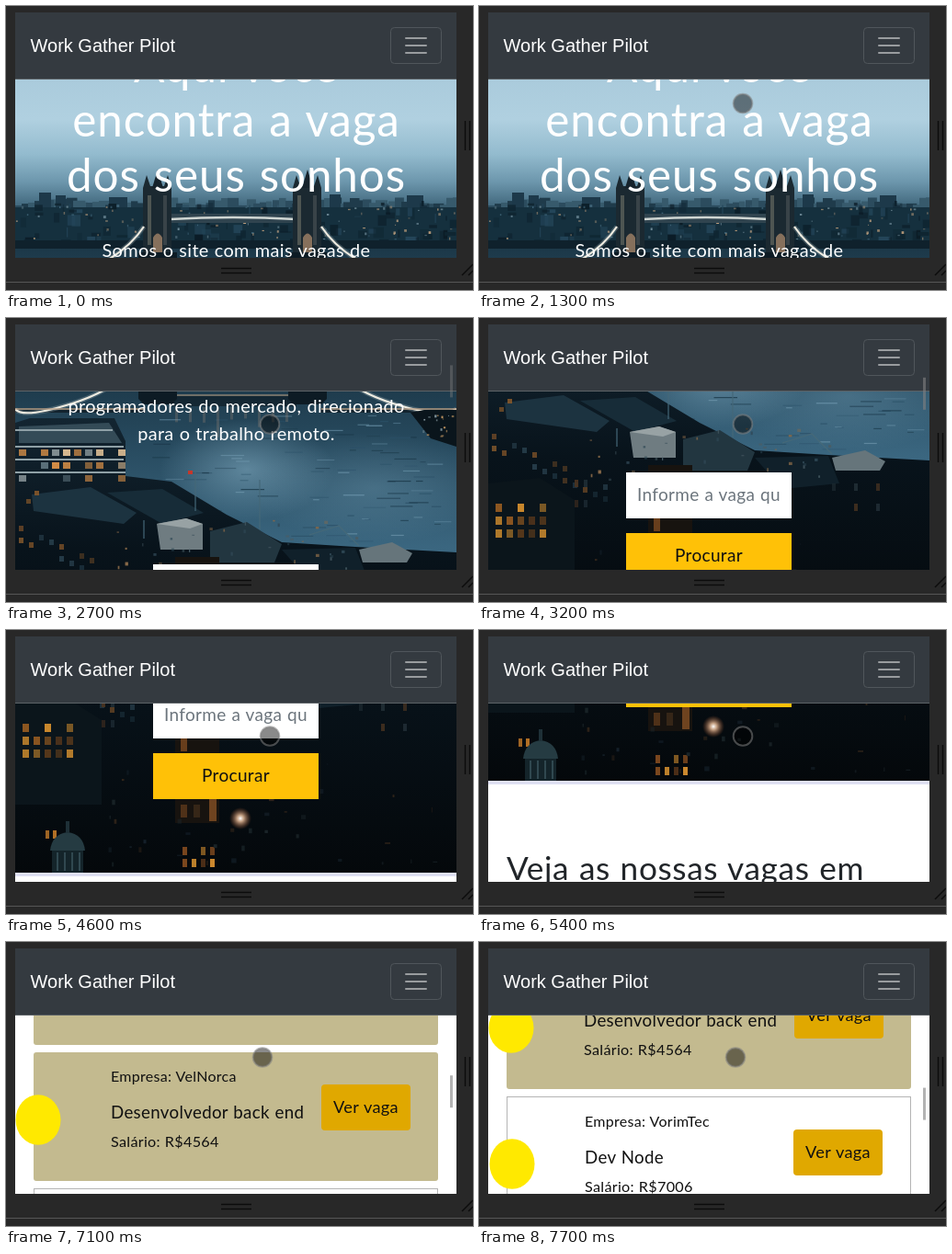
These frames come from a looping animation (508x309 px, 8000 ms). An HTML page:

```html
<!DOCTYPE html>
<html lang="pt">
<head>
<meta charset="utf-8">
<title>Vagas</title>
<style>
html, body { margin: 0; width: 100%; height: 100%; overflow: hidden; background: #282828; }
svg { display: block; width: 508px; height: 309px; }
text { font-family: Lato, "Open Sans", sans-serif; letter-spacing: .018em; word-spacing: .03em; }
.brand { font-family: "Liberation Sans", Arial, sans-serif; letter-spacing: 0; word-spacing: 0; }
</style>
</head>
<body>
<svg id="stage" viewBox="0 0 508 309" xmlns="http://www.w3.org/2000/svg">
  <defs>
    <clipPath id="view"><rect x="10" y="79" width="480" height="195"/></clipPath>
    <clipPath id="field"><rect x="172" y="468" width="156" height="50"/></clipPath>
    <linearGradient id="sky" x1="0" y1="0" x2="0" y2="1">
      <stop offset="0" stop-color="#a9cadb"/><stop offset=".35" stop-color="#b0d0e0"/>
      <stop offset=".6" stop-color="#93bbce"/><stop offset=".8" stop-color="#6c96ac"/>
      <stop offset="1" stop-color="#3a6075"/>
    </linearGradient>
    <linearGradient id="river" x1="0" y1="0" x2="0" y2="1">
      <stop offset="0" stop-color="#1b3646"/><stop offset=".35" stop-color="#26485c"/>
      <stop offset="1" stop-color="#3d6a84"/>
    </linearGradient>
    <radialGradient id="shine">
      <stop offset="0" stop-color="#7fa9bf" stop-opacity=".6"/><stop offset="1" stop-color="#7fa9bf" stop-opacity="0"/>
    </radialGradient>
    <linearGradient id="bank" x1="0" y1="0" x2="0" y2="1">
      <stop offset="0" stop-color="#132531"/><stop offset=".4" stop-color="#08131b"/>
      <stop offset="1" stop-color="#04080b"/>
    </linearGradient>
    <radialGradient id="glow">
      <stop offset="0" stop-color="#fff"/><stop offset=".3" stop-color="#f2c5a0" stop-opacity=".8"/>
      <stop offset="1" stop-color="#a05028" stop-opacity="0"/>
    </radialGradient>
  </defs>
  <g clip-path="url(#view)"><g id="page"></g></g>
  <g id="frame"></g>
  <rect id="thumb" x="483" width="3" height="35" fill="#808080" fill-opacity=".6"/>
  <circle id="touch" r="10.3" fill="#000" fill-opacity=".46" stroke="#808080" stroke-opacity=".55" stroke-width="2"/>
</svg>
<script>
const $ = id => document.getElementById(id);
const page = $('page'), frame = $('frame'), thumb = $('thumb'), touch = $('touch');

function add(parent, tag, attrs, content) {
  const el = document.createElementNS('http://www.w3.org/2000/svg', tag);
  for (const k in attrs) el.setAttribute(k, attrs[k]);
  if (content) el.textContent = content;
  parent.appendChild(el);
  return el;
}
const rect = (x, y, width, height, fill, more) =>
  add(page, 'rect', { x, y, width, height, fill, ...more });
const path = (d, fill, more) => add(page, 'path', { d, fill, ...more });
const line = (d, stroke, width, parent = page) =>
  add(parent, 'path', { d, fill: 'none', stroke, 'stroke-width': width });
const text = (str, x, y, size, fill, more) =>
  add(page, 'text', { x, y, 'font-size': size, fill, ...more }, str);
const middle = { 'text-anchor': 'middle' };

let seed = 7;
const rnd = (a, b) => {
  seed = (seed * 16807) % 2147483647;
  return a + (b - a) * seed / 2147483647;
};
const pick = list => list[Math.floor(rnd(0, list.length))];

// Small specks of light inside a box
function lights(n, x, y, w, h, colors, size) {
  for (let i = 0; i < n; i++)
    rect(rnd(x, x + w), rnd(y, y + h), rnd(1, size), rnd(1, size), pick(colors), { opacity: rnd(.4, 1) });
}

// Rows of lit windows, each column shifted down by slope
function windows(x, y, cols, rows, dx, dy, w, h, colors, slope = 0) {
  for (let r = 0; r < rows; r++)
    for (let c = 0; c < cols; c++)
      if (rnd(0, 1) > .35)
        rect(x + c * dx, y + r * dy + c * slope, w, h, pick(colors), { opacity: rnd(.5, 1) });
}

function skyline() {
  rect(10, 70, 480, 152, 'url(#sky)');
  for (let x = 10; x < 490; x += 7) {
    const h = rnd(2, 11);
    rect(x, 219 - h, rnd(6, 14), h + 14, pick(['#2c4c5e', '#1f3b4b', '#375a6c']));
  }
  for (const [x, y, w] of [[36, 203, 13], [54, 206, 11], [112, 208, 20], [352, 205, 12], [436, 206, 18]])
    rect(x, y, w, 30, '#1d394a');
  rect(10, 219, 480, 45, '#15303e');
  lights(110, 10, 212, 480, 46, ['#0b1c26', '#24465a', '#0f2531'], 13);
  lights(110, 10, 216, 480, 44, ['#6f8b98', '#9c8a74', '#42677b', '#c9a57f'], 3);
}

function tower(x) {
  path(`M${x - 3} 270V198l4-14 4 12h15l4-12 4 14v72z`, '#1b2931');
  path(`M${x + 7} 198l6-20 6 20z`, '#15222b');
  rect(x + 2, 206, 4, 54, '#4e5552');
  rect(x + 19, 206, 4, 54, '#394348');
  path(`M${x + 8} 268v-16q5-9 10 0v16z`, '#86705c');
  path(`M${x - 8} 268h42v20l-6 6h-30l-6-6z`, '#0d1b24');
}

function bridge() {
  rect(10, 255, 480, 210, 'url(#river)');
  rect(10, 255, 480, 9, '#0f212c');
  add(page, 'ellipse', { cx: 262, cy: 365, rx: 95, ry: 55, fill: 'url(#shine)' });
  add(page, 'ellipse', { cx: 400, cy: 385, rx: 130, ry: 60, fill: 'url(#shine)', opacity: .5 });
  for (let i = 0; i < 90; i++)
    rect(rnd(130, 470), rnd(305, 445), rnd(6, 26), 1.2, pick(['#6d95ab', '#1b3849', '#2b5067']), { opacity: rnd(.3, .8) });
  rect(178, 226, 138, 10, '#30444f');
  line('M178 232Q247 228 316 232', '#cfd6d3', 2.5);
  rect(178, 284, 138, 12, '#142733');
  line('M178 284H316', '#8e8474', 1.5);
  tower(152);
  tower(315);
  rect(10, 298, 142, 5, '#12232e');
  rect(342, 298, 148, 5, '#12232e');
  for (const d of ['M150 240Q126 276 72 293T10 299', 'M343 240Q367 276 421 293T490 299']) {
    line(d, '#8fa1a5', 5).setAttribute('opacity', .35);
    line(d, '#eeebe0', 2.2);
  }
  line('M10 299H150M343 299H490', '#b7a18a', 1.5);
  for (let i = 0; i < 9; i++)
    rect(184 + i * 15, 297, 3, rnd(12, 40), '#a98d78', { opacity: .25 });
  path('M440 303L455 300H490V340L462 331z', '#0a151c');
  lights(16, 450, 303, 38, 30, ['#c79a63', '#8ca0a8'], 3);
}

function bank() {
  path('M10 314L26 309H118L130 334V372L180 378L240 414L300 444L380 449L490 455V664H10z', 'url(#bank)');

  // Terraces by the water
  path('M14 318L112 314L126 336H14z', '#344b57');
  line('M10 322H116M10 340H128M10 354H128M10 368H130', '#8fa0a6', 2);
  windows(14, 343, 10, 3, 12, 14, 8, 7, ['#e9c79a', '#bcc7c8', '#5c717b', '#d58e47']);
  rect(198, 366, 5, 4, '#c5372b');

  // Roofs
  path('M28 392L92 384L142 412L128 424L30 410z', '#1c3340');
  path('M110 390L170 386L215 412L170 424z', '#172c38');
  path('M164 424L196 418L214 424V452H168z', '#6f7c81');
  path('M164 424L196 418L214 424L200 429z', '#98a2a4');
  path('M222 432L262 422L300 446L292 466H222z', '#223640');
  path('M384 452L420 444L442 456L436 466H388z', '#66757b');
  path('M300 452L380 450L392 480L330 486z', '#10202a');
  line('M206 368V410M276 376V430M150 420V440M330 436L362 426L384 448', '#456878', 1.2);
  windows(14, 426, 13, 2, 11, 13, 5, 6, ['#1d333f', '#6b4826', '#2c4452', '#a06a30'], 5);
  windows(22, 388, 2, 2, 9, 9, 5, 5, ['#d69139', '#8b5a2a']);
  lights(40, 120, 415, 270, 60, ['#4a5d66', '#8a6a48', '#2f4755'], 4);

  // Lit house on the left
  path('M10 480L66 474L104 498V590H10z', '#0b151b');
  windows(18, 502, 5, 3, 12, 14, 7, 9, ['#e0962f', '#b36a22', '#5f3b1b']);
  windows(104, 476, 2, 3, 10, 22, 4, 8, ['#4a3320', '#223039']);
  windows(360, 480, 5, 2, 24, 22, 4, 8, ['#4b3522', '#1f2c33', '#6a4524']);

  // Tall house in the middle
  path('M184 460H232V610H184z', '#17130f');
  windows(190, 470, 3, 6, 14, 24, 7, 14, ['#7e4a20', '#4e351f', '#b36e2d']);
  rect(221, 580, 8, 28, '#6e431f');
  windows(192, 636, 4, 2, 10, 13, 5, 9, ['#e69a33', '#8a4f20']);
  add(page, 'circle', { cx: 255, cy: 605, r: 12, fill: 'url(#glow)' });
  windows(43, 618, 2, 1, 8, 8, 4, 9, ['#d9872b']);

  // Dome
  path('M48 640Q50 622 67 620Q84 622 86 640z', '#253b42');
  rect(65, 608, 4, 13, '#1e3037');
  rect(50, 640, 34, 24, '#14242a');
  line('M56 642V662M64 642V662M72 642V662M80 642V662', '#304850', 2);
  lights(36, 110, 540, 370, 115, ['#1b2529', '#35271b', '#15212a'], 6);
}

function hero() {
  skyline();
  bridge();
  bank();
  const white = '#fff';
  ['Aqui você', 'encontra a vaga', 'dos seus sonhos']
    .forEach((s, i) => text(s, 250.5, 82.5 + i * 59.5, 49.4, white, middle));
  ['Somos o site com mais vagas de', 'programadores do mercado, direcionado', 'para o trabalho remoto.']
    .forEach((s, i) => text(s, 250.5, 273 + i * 30, 19.9, white, middle));
  rect(160, 468, 180, 50, white);
  text('Informe a vaga que', 172, 499, 19, '#6c757d', { 'clip-path': 'url(#field)' });
  rect(160, 534, 180, 50, '#ffc107');
  text('Procurar', 250, 565, 19, '#111', middle);
}

function card(i, company, job, pay, plain) {
  const y = 872 + i * 148, d = plain ? 1 : 0;
  if (plain) rect(30.5, y + .5, 439, 139, '#fff', { stroke: '#b4b4b4' });
  else rect(30, y, 440, 140, '#c3ba8f', { rx: 3 });
  add(page, 'ellipse', { cx: 35 + d, cy: y + 73.5, rx: 24.5, ry: 27.3, fill: '#ffe900' });
  text('Empresa: ' + company, 114 + d, y + 32 + d, 16, '#111');
  text(job, 114 + d, y + 72 + d, 18.7, '#111');
  text('Salário: R$' + pay, 114 + d, y + 103 + d, 16.2, '#111');
  rect(343 - d, y + 35 + d, 97, 50, '#e0a800', { rx: 4 });
  text('Ver vaga', 391.5 - d, y + 66 + d, 18.2, '#111', middle);
}

function chrome() {
  add(frame, 'rect', { x: 10, y: 7, width: 480, height: 72, fill: '#343a40' });
  line('M10 79.5H490', '#5c6266', 1, frame);
  add(frame, 'text', { x: 26.5, y: 50, 'font-size': 20, fill: '#fff', class: 'brand' }, 'Work Gather Pilot');
  add(frame, 'rect', { x: 418.5, y: 23.5, width: 55, height: 39, rx: 4, fill: 'none', stroke: '#50565b' });
  line('M435 35H457M435 43H457M435 51H457', '#999c9f', 2, frame).setAttribute('stroke-linecap', 'round');
  line('M234 285.5H267M234 290.5H267M499.5 125V157M504.5 125V157M496 293L508 281M503 293L508 288', '#0c0c0c', 1.5, frame);
  line('M0 300.5H508', '#565656', 1, frame);
}

rect(10, 0, 480, 1400, '#fff');
hero();
rect(10, 664, 480, 4, '#dfe0f3');
text('Veja as nossas vagas em', 30, 772, 35.2, '#212529');
text('destaque', 28.5, 813, 35.2, '#212529');
card(0, 'TekBrul', 'Programador Phyton', 4670);
card(1, 'VelNorca', 'Desenvolvedor back end', 4564);
card(2, 'VorimTec', 'Dev Node', 7006, true);
chrome();

// Each scroll step: start, fade start, number of fade steps
const scrolls = [
  [1600, 2000, 3], [2400, 2700, 3], [3200, 3600, 3], [4000, 4400, 3], [4900, 5200, 3],
  [5500, 5900, 3], [6100, 6400, 3], [6600, 6900, 3], [7100, 7400, 2], [7700, 8000, 3]
];
// Pointer path: time, x, y
const moves = [
  [100, 82, 31], [500, 279, 98], [700, 279, 98], [800, 281, 97], [900, 281, 97], [1300, 287, 106],
  [1900, 287, 106], [2200, 287, 115.5], [5800, 287, 115.5], [6100, 279, 125.5], [8000, 279, 125.5]
];

function pointerAt(t) {
  const i = Math.max(1, moves.findIndex(m => m[0] >= t));
  const [t0, x0, y0] = moves[i - 1], [t1, x1, y1] = moves[i];
  const k = (t - t0) / (t1 - t0);
  return [x0 + (x1 - x0) * k, y0 + (y1 - y0) * k];
}

function draw(ms) {
  const t = Math.floor(ms / 100) * 100;
  const n = scrolls.filter(s => s[0] <= t).length;
  page.setAttribute('transform', `translate(0 ${-100 * n})`);

  let alpha = 0;
  if (n) {
    const [, fade, steps] = scrolls[n - 1];
    alpha = t < fade ? 1 : Math.max(0, 1 - ((t - fade) / 100 + 1) / steps);
  }
  thumb.setAttribute('y', 38 + 13.4 * (n - 1));
  thumb.setAttribute('opacity', alpha);

  const [x, y] = pointerAt(Math.max(t, 100));
  touch.setAttribute('cx', x);
  touch.setAttribute('cy', y);
  touch.setAttribute('opacity', t < 100 ? 0 : 1);
}

const start = performance.now();
function tick() {
  draw((performance.now() - start) % 8000);
  requestAnimationFrame(tick);
}
tick();
</script>
</body>
</html>
```
